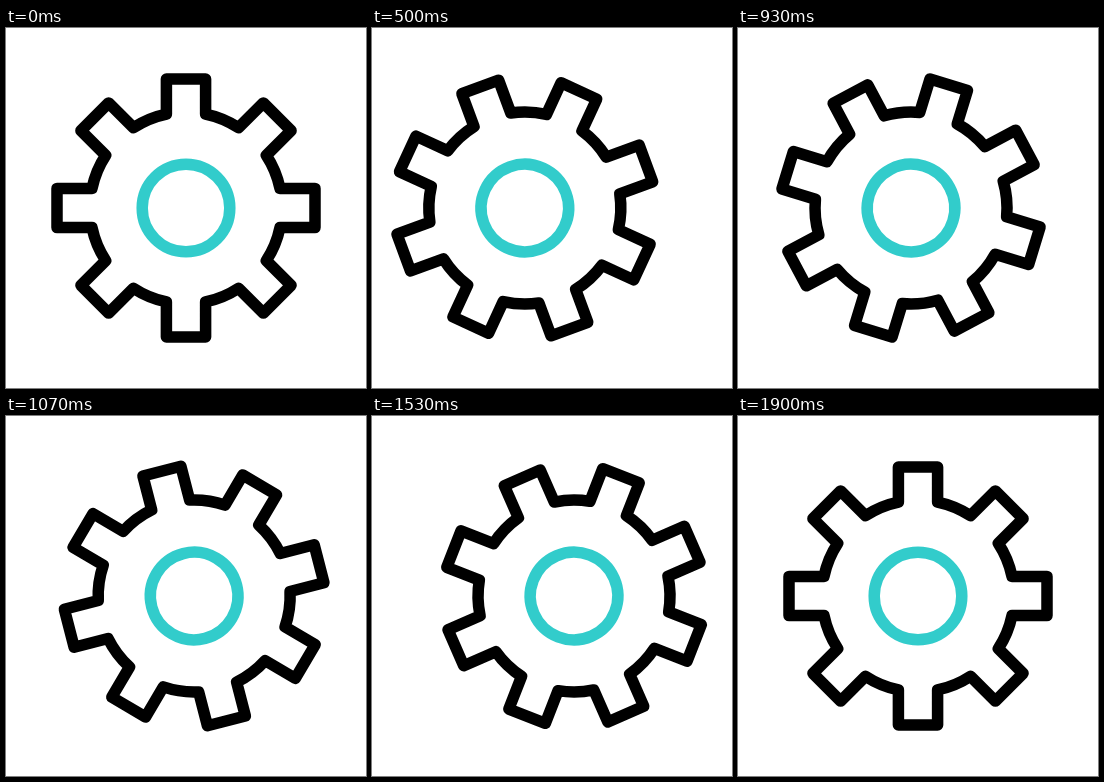
An HTML page with a canvas that plays this animation: 360x360 px, repeating every 2000 ms.

```html
<!DOCTYPE html>
<html lang="en">
<head>
<meta charset="utf-8">
<title>Rolling gear</title>
<style>
  html, body { margin: 0; width: 100%; height: 100%; overflow: hidden; background: #fff; }
  canvas { display: block; width: 360px; height: 360px; }
</style>
</head>
<body>
<canvas id="stage"></canvas>
<script>
const LOOP = 2000, LAST = 57;
const TEETH = 8, HALF = 19.6, TIP = 129, ROOT = 96;
const LINE = 11.5, RING = 43.8;

// Each leg ends at a step, with a shift in px and a turn in degrees.
const legs = [
  { end: 19, x: -30, turn: -72, xPow: 0.89, turnPow: 0.89 },
  { end: 42, x: 30, turn: 160, xPow: 0.92, turnPow: 0.92 },
  { end: LAST, x: 0, turn: 0, xPow: 0.82, turnPow: 0.76 }
];

const canvas = document.getElementById("stage");
const ctx = canvas.getContext("2d");
const scale = window.devicePixelRatio || 1;
canvas.width = canvas.height = 360 * scale;

const smooth = p => p * p * (3 - 2 * p);
const mix = (a, b, k) => a + (b - a) * k;

function pose(step) {
  let from = { end: 0, x: 0, turn: 0 };
  for (const leg of legs) {
    if (step <= leg.end) {
      const p = (step - from.end) / (leg.end - from.end);
      return {
        x: mix(from.x, leg.x, smooth(p ** leg.xPow)),
        turn: mix(from.turn, leg.turn, smooth(p ** leg.turnPow))
      };
    }
    from = leg;
  }
  return from;
}

function gearPath() {
  const path = new Path2D();
  const pitch = 2 * Math.PI / TEETH;
  const rootAngle = Math.asin(HALF / ROOT);
  const tipAngle = Math.atan2(HALF, TIP);
  const tipRadius = Math.hypot(HALF, TIP);
  for (let i = 0; i < TEETH; i++) {
    const mid = i * pitch;
    for (const a of [mid - tipAngle, mid + tipAngle]) {
      path.lineTo(tipRadius * Math.cos(a), tipRadius * Math.sin(a));
    }
    path.arc(0, 0, ROOT, mid + rootAngle, mid + pitch - rootAngle);
  }
  path.closePath();
  return path;
}

const gear = gearPath();

function draw(now) {
  const t = now % LOOP;
  const step = Math.min(LAST, Math.floor((t + 4) * 0.03));
  const { x, turn } = pose(step);

  ctx.setTransform(scale, 0, 0, scale, 0, 0);
  ctx.fillStyle = "#fff";
  ctx.fillRect(0, 0, 360, 360);
  ctx.translate(180 + x, 180);
  ctx.rotate(turn * Math.PI / 180);
  ctx.lineWidth = LINE;
  ctx.lineJoin = "round";
  ctx.strokeStyle = "#000";
  ctx.stroke(gear);
  ctx.strokeStyle = "#32cccb";
  ctx.beginPath();
  ctx.arc(0, 0, RING, 0, 2 * Math.PI);
  ctx.stroke();
}

const start = performance.now();
function tick() {
  draw(performance.now() - start);
  requestAnimationFrame(tick);
}
tick();
</script>
</body>
</html>
```
